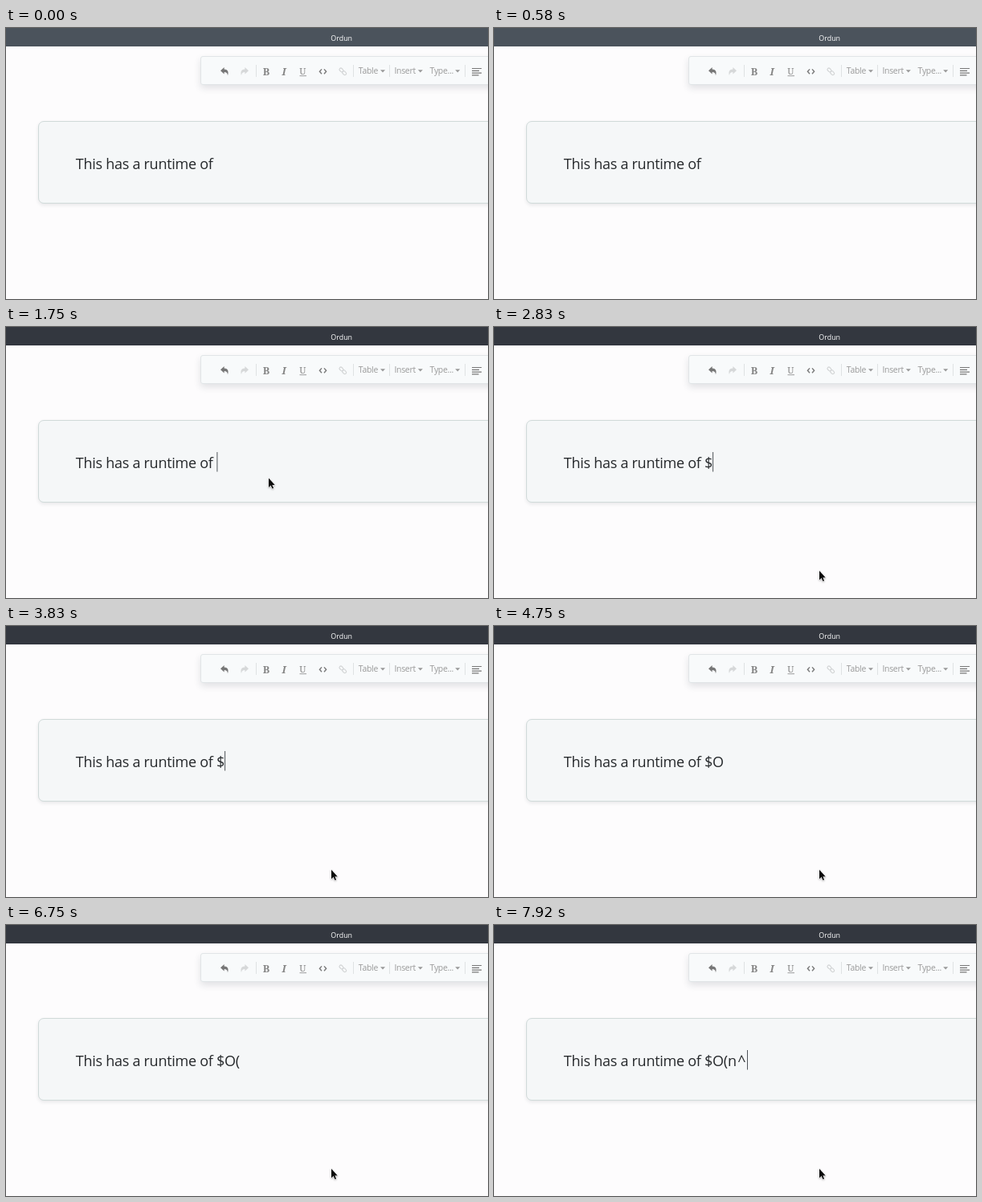
An HTML page that plays this animation: 600 by 338 pixels, repeating every 8 s.

```html
<!DOCTYPE html>
<html lang="en">
<head>
<meta charset="utf-8">
<title>Editor</title>
<style>
  html, body { margin: 0; width: 100%; height: 100%; overflow: hidden; background: #fdfcfd; }
  .stage { position: relative; width: 600px; height: 338px; overflow: hidden; }
  .stage > * { position: absolute; box-sizing: border-box; }
  .bar { left: 0; top: 0; width: 600px; height: 23px; background: #4b535c; }
  .tools { left: 242px; top: 35px; width: 380px; height: 36px; border: 1px solid #e1e5e7;
    border-radius: 3px; background: #f8fafb; box-shadow: 0 4px 9px rgba(40, 50, 60, .13); }
  .card { left: 40px; top: 116px; width: 590px; height: 103px; border: 1px solid #d0dad9;
    border-radius: 7px; background: #f5f7f8; box-shadow: 0 2px 4px rgba(40, 50, 60, .1); }
  svg { left: 0; top: 0; }
  text { font-family: "Open Sans", "Noto Sans", sans-serif; white-space: pre; }
  .title { font-size: 8.9px; font-weight: 500; fill: #fff; text-anchor: middle; }
  .menu { font-size: 10.4px; letter-spacing: -.25px; fill: #999; }
  .serif { font-family: "Noto Serif", "Liberation Serif", serif; font-size: 12.6px; fill: #858585; }
  .body { font-size: 18px; letter-spacing: -.27px; fill: #25282b; }
</style>
</head>
<body>
<div class="stage">
  <div class="bar" id="bar"></div>
  <div class="tools"></div>
  <div class="card"></div>
  <svg width="600" height="338" viewBox="0 0 600 338">
    <defs>
      <path id="back" d="M267 53.2 271.6 49V51.5C275.8 51.5 277.6 54.4 276 59.3 275.7 56.4 274.4 55.1 271.6 55.1V57.6Z"/>
      <path id="drop" d="M0 0H6L3 3.2Z" fill="#999"/>
    </defs>
    <text class="title" x="417.7" y="15.6">Ordun</text>

    <use href="#back" fill="#777"/>
    <use href="#back" fill="#d6d8d9" transform="translate(569) scale(-1 1)"/>
    <path d="M311.5 46V61M432.5 46V61M477.5 46V61M571.5 46V61" stroke="#dfe2e3"/>

    <text class="serif" x="319.8" y="59" font-weight="700">B</text>
    <text class="serif" x="343.6" y="59" font-style="italic" font-weight="600">I</text>
    <text class="serif" x="365.2" y="58" style="font-size:11.4px">U</text>
    <path d="M365.5 59.7H374" stroke="#909090" stroke-width=".9"/>
    <path d="M393 51.4 390.4 54.3 393 57.2M396 51.4 398.6 54.3 396 57.2" fill="none" stroke="#777" stroke-width="1.4"/>
    <g fill="none" stroke="#d3d5d6" stroke-width="1.2" transform="rotate(45 419.3 54.3)">
      <rect x="414" y="52.5" width="5.4" height="3.6" rx="1.7"/>
      <rect x="419.2" y="52.5" width="5.4" height="3.6" rx="1.7"/>
    </g>

    <text class="menu" x="438.8" y="57.4">Table</text>
    <text class="menu" x="483.4" y="57.4">Insert</text>
    <text class="menu" x="527.6" y="57.4">Type...</text>
    <use href="#drop" x="466" y="52.2"/>
    <use href="#drop" x="512.8" y="52.2"/>
    <use href="#drop" x="559.2" y="52.2"/>
    <path d="M580 50.5H592M580 53.3H589M580 56.1H592M580 58.9H588.5" stroke="#777" stroke-width="1.2"/>

    <text class="body" x="86.7" y="176"><tspan id="line">This has a runtime of </tspan><tspan id="hat" x="303.6"></tspan></text>
    <path id="caret" d="M0 156V180.5" stroke="#50555a" visibility="hidden"/>
    <path id="mouse" d="M0 0V11.4L2.6 9 4.4 13.1 6.1 12.4 4.3 8.4H7.7Z" fill="#0a0a0a" stroke="#fff"
      stroke-width="1" paint-order="stroke" visibility="hidden" style="filter:drop-shadow(0 1px 1px rgba(0,0,0,.3))"/>
  </svg>
</div>
<script>
const LOOP = 8000, STEP = 1000 / 12, BLINK = 530;
const BASE = 'This has a runtime of ';

// time, typed text, caret x
const typing = [
  [560, '', 262.9],
  [2650, '$', 272.6],
  [3990, '$O', 286.4],
  [5160, '$O(', 291.6],
  [6990, '$O(n', 302.4],
  [7410, '$O(n^', 315.5]
];

// time, pointer x, y
const path = [
  [1080, 200, 201],
  [1420, 314, 193],
  [1750, 327, 188.5],
  [2080, 405, 304]
];

const $ = id => document.getElementById(id);
const [bar, line, hat, caret, mouse] = ['bar', 'line', 'hat', 'caret', 'mouse'].map($);
const show = (el, on) => el.setAttribute('visibility', on ? 'visible' : 'hidden');
const ease = p => p * p * (3 - 2 * p);

function pointer(t) {
  const i = path.findIndex(k => k[0] > t);
  if (i === 0) return null;
  if (i < 0) return path[path.length - 1].slice(1);
  const [t0, x0, y0] = path[i - 1], [t1, x1, y1] = path[i];
  const p = ease((t - t0) / (t1 - t0));
  return [x0 + (x1 - x0) * p, y0 + (y1 - y0) * p];
}

function draw(now) {
  const t = Math.floor((now % LOOP) / STEP + .01) * STEP;

  bar.style.background = t < 580 ? '#4b535c' : '#33373f';

  const key = typing.filter(k => k[0] <= t).pop();
  const typed = key ? key[1] : '';
  line.textContent = BASE + typed.replace('^', '');
  hat.textContent = typed.includes('^') ? '^' : '';
  show(caret, key && Math.floor((t - key[0]) / BLINK) % 2 === 0);
  if (key) caret.setAttribute('transform', `translate(${key[2]})`);

  const at = pointer(t);
  show(mouse, at);
  if (at) mouse.setAttribute('transform', `translate(${at})`);
}

const start = performance.now();
function tick() {
  draw(performance.now() - start);
  requestAnimationFrame(tick);
}
tick();
</script>
</body>
</html>
```
